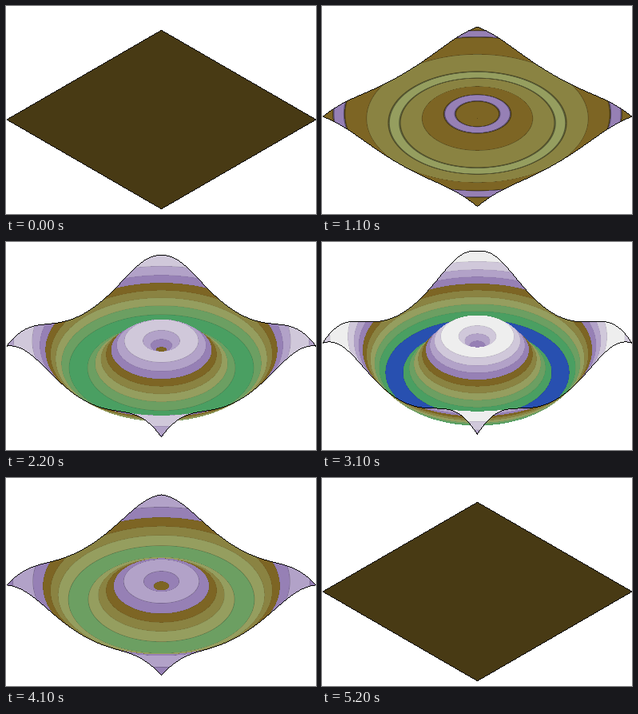
An HTML page with a canvas for the animation above (5500 ms loop, 388x260 px).

```html
<!DOCTYPE html>
<html lang="en">
<head>
<meta charset="utf-8">
<title>Rippling surface</title>
<style>
  html, body { margin: 0; width: 100%; height: 100%; overflow: hidden; background: #fff; }
  canvas { display: block; width: 388px; height: 260px; }
</style>
</head>
<body>
<canvas id="stage" width="388" height="260"></canvas>
<script>
const W = 388, H = 260;
const ctx = document.getElementById('stage').getContext('2d');
const img = ctx.createImageData(W, H);
const px = new Uint32Array(img.data.buffer);

// z = a sin(r) in isometric projection; x and y run from -2π in whole
// grid steps, so the wave sits slightly behind the middle of the square
const CX = 194, CY = 142, HALF = 193.5;
const TILT = Math.tan(Math.PI / 6);
const GRID = 0.2, FROM = -2 * Math.PI;
const SPAN = Math.floor(-2 * FROM / GRID) * GRID;
const UNIT = HALF / (SPAN / 2 * Math.SQRT2);
const SHIFT = (FROM + SPAN / 2) * Math.SQRT2 * UNIT;
const PEAK = 28.2, BAND = PEAK / 5;
const LINE = 0.1, SHADE = 0.42;

const LOOP = 5500, STEP = 100;
const MID = 29, RISE = 22.8;

const BLACK = 0xff000000, WHITE = 0xffffffff;
const palette = [
  [40, 80, 176], [74, 159, 98], [108, 159, 98], [149, 158, 95], [138, 131, 66],
  [125, 101, 36], [150, 128, 181], [178, 162, 200], [208, 200, 218], [238, 238, 238]
];

const clamp = (v, lo, hi) => Math.min(hi, Math.max(lo, v));
const radius = (p, w) => Math.hypot(p, w - SHIFT) / UNIT;

// Band colour, darkened near the contour levels
function colour(p, w, a) {
  const r = radius(p, w);
  const z = a * Math.sin(r);
  const rgb = palette[clamp(Math.floor(z / BAND) + 5, 0, 9)];
  const level = clamp(Math.round(z / BAND), -4, 4);
  const dist = Math.abs(z - level * BAND);
  const slope = Math.max(1e-6, Math.abs(a * Math.cos(r)) / UNIT);
  const cover = clamp((LINE + slope / 2 - dist) / slope, 0, 1) * Math.min(1, 2 * LINE / slope);
  const k = 1 - SHADE * cover;
  return (BLACK | (rgb[2] * k) << 16 | (rgb[1] * k) << 8 | (rgb[0] * k)) >>> 0;
}

// One column, painted from back to front; returns its top and front edge
function drawColumn(x, a) {
  const p = x - CX, reach = HALF - Math.abs(p);
  const n = Math.max(2, Math.ceil(reach * 4));
  const dw = 2 * reach / n;
  const screenY = w => CY + w * TILT - a * Math.sin(radius(p, w));
  let y0 = screenY(-reach), top = y0;
  for (let i = 1; i <= n; i++) {
    const w = -reach + i * dw, y1 = screenY(w);
    const end = Math.max(y0, y1) - 0.5;
    for (let row = Math.ceil(Math.min(y0, y1) - 0.5); row < end; row++) {
      const f = (row + 0.5 - y0) / (y1 - y0);
      px[row * W + x] = colour(p, w - dw * (1 - f), a);
    }
    top = Math.min(top, y1);
    y0 = y1;
  }
  return [Math.floor(top), Math.floor(y0)];
}

// Joins neighbouring rows of an edge with a one pixel line
function drawEdge(rows, first) {
  rows.forEach((row, i) => {
    const x = first + i;
    px[row * W + x] = BLACK;
    if (!i) return;
    const prev = rows[i - 1], dir = Math.sign(row - prev);
    if (!dir) return;
    const mid = Math.trunc((prev + row) / 2);
    for (let y = prev + dir; y !== row; y += dir) {
      px[y * W + ((y - mid) * dir > 0 ? x : x - 1)] = BLACK;
    }
  });
}

function render(a) {
  px.fill(WHITE);
  const first = 1, tops = [], fronts = [];
  for (let x = first; x < W; x++) {
    const [top, front] = drawColumn(x, a);
    tops.push(top);
    fronts.push(front);
  }
  drawEdge(tops, first);
  drawEdge(fronts, first);
  ctx.putImageData(img, 0, 0);
}

let shown = -1;
const start = performance.now();

function tick(now) {
  const step = Math.floor(Math.max(0, now - start) % LOOP / STEP);
  if (step !== shown) {
    shown = step;
    render(PEAK * Math.max(0, 1 - Math.abs(step - MID) / RISE));
  }
  requestAnimationFrame(tick);
}
tick(start);
</script>
</body>
</html>
```
